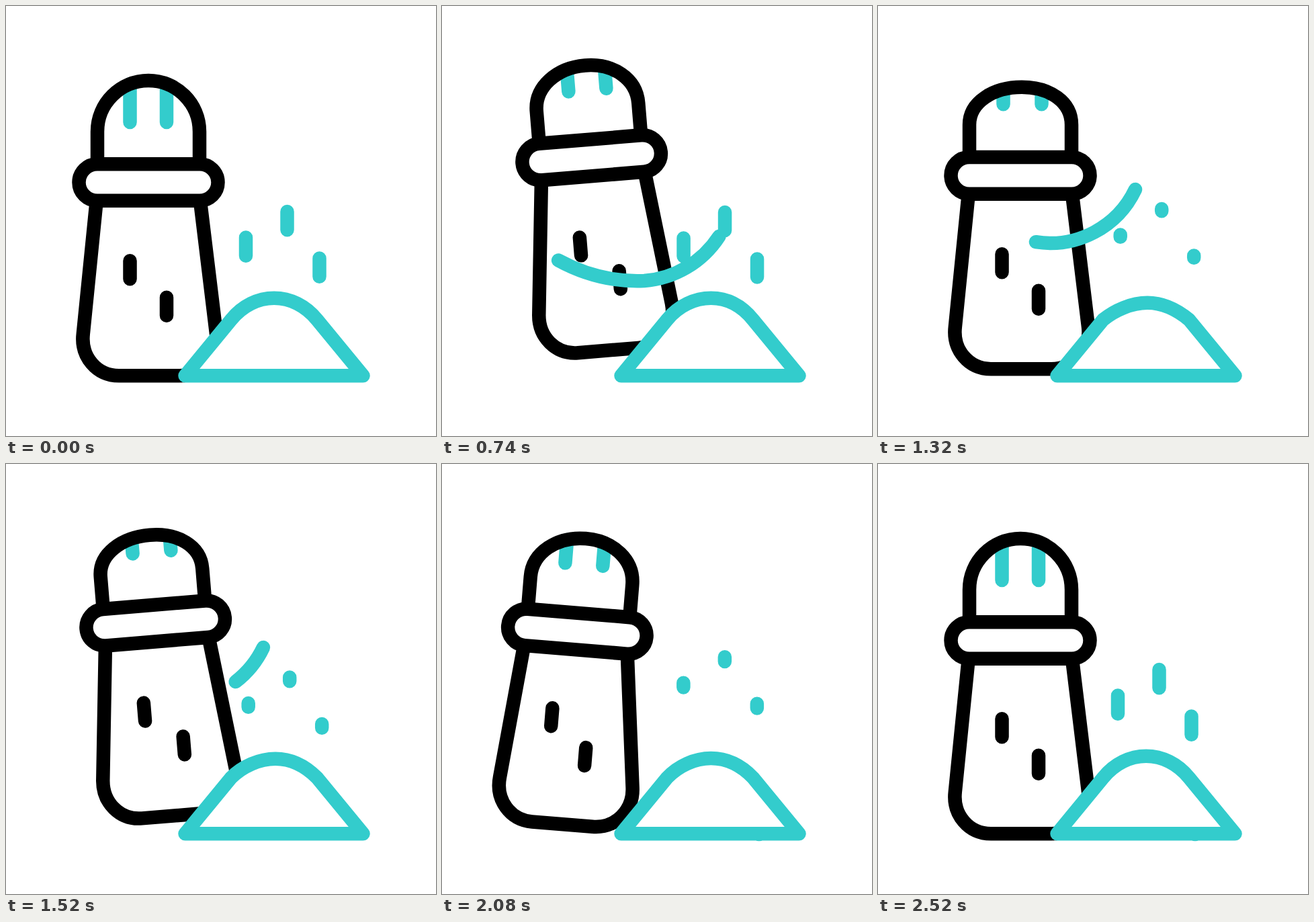
An HTML page that plays this animation: 640 px wide and 640 px high, repeating every 2800 ms.

```html
<!DOCTYPE html>
<html lang="en">
<head>
<meta charset="utf-8">
<title>Salt shaker</title>
<style>
  html, body { margin: 0; width: 100%; height: 100%; overflow: hidden; background: #fff; }
  svg { display: block; width: 100vw; height: 100vh; }
  svg * { stroke-width: 20.5; stroke-linecap: round; stroke-linejoin: round; }
  .ink { fill: none; stroke: #000; }
  .salt { fill: none; stroke: #3cc; }
  #pile { fill: #fff; }
  #dome, #body { stroke-linecap: butt; }
</style>
</head>
<body>
<svg viewBox="0 0 640 640">
  <g id="shaker">
    <path id="holes" class="salt"/>
    <path id="dome" class="ink"/>
    <path id="body" class="ink" d="M134.5 292 L114.8 488 C111 522 135 550.3 168 550.3 H258 C292 550.3 317 522 313 488 L289.2 292"/>
    <rect class="ink" x="108.5" y="235.2" width="207" height="54.6" rx="27.3"/>
    <path class="ink" d="M184.5 379.3 v27 M239 433.8 v27"/>
  </g>
  <path id="low" class="salt" pathLength="1" d="M172 378 C210 399 255 411 301 409 C352 405 398 375 422 326"/>
  <path id="high" class="salt" pathLength="1" d="M200 341 A140 140 0 0 0 383 273"/>
  <path id="grains" class="salt"/>
  <path id="pile" class="salt"/>
</svg>
<script>
const LOOP = 2800, START = 320, SHAKE = 960;
const GRAINS = [[357, 344.5], [418.5, 306], [466.5, 375.5]];
const GRAIN_LENGTH = 27.2, DROP = 148, FALL_TIME = 510;

const $ = id => document.getElementById(id);
const clamp = p => Math.min(1, Math.max(0, p));
const mix = (a, b, p) => a + (b - a) * p;

// Smooth step from 0 to 1.
function ramp(t, start, duration) {
  const p = clamp((t - start) / duration);
  return p * p * (3 - 2 * p);
}

// Two equal shakes: lean left, swing right, settle, with one hop each.
function shake(t) {
  const u = t < START + SHAKE ? t - START : t - START - SHAKE;
  return {
    lift: -31 * (ramp(u, 0, 480) - ramp(u, 505, 425)),
    tilt: 4.7 * (2 * ramp(u, 450, 360) - ramp(u, 40, 140) - ramp(u, 810, 150))
  };
}

function drawShaker(t, s) {
  const { lift, tilt } = shake(t);
  $('shaker').setAttribute('transform', `translate(0 ${lift - 9.5 * s}) rotate(${tilt} 212 132)`);
  const ry = 76 - 20 * s, top = 187 - ry, mid = 212 + 2 * s, side = 145 + 8 * s;
  $('dome').setAttribute('d',
    `M136 236 V187 C136 ${side} ${mid - 42} ${top} ${mid} ${top}` +
    ` C${mid + 42} ${top} 288 ${side} 288 187 V236`);
  const hole = x => {
    const y = 187 - ry * Math.sqrt(1 - ((x - mid) / 76) ** 2);
    return `M${x} ${y} V${173 - 16.5 * s}`;
  };
  $('holes').setAttribute('d', hole(184.5 + 2 * s) + hole(239 + 4.5 * s));
}

function drawSwoosh(id, t) {
  const end = ramp(t, 0, 500), start = ramp(t, 400, 540);
  const { style } = $(id);
  style.display = end - start > 0.001 ? '' : 'none';
  style.strokeDasharray = `${end - start} 3`;
  style.strokeDashoffset = -start;
}

// Offsets of the upper and lower end of every grain.
function grainOffsets(t) {
  if (t < 1228) {
    const y = DROP * ramp(t, 718, FALL_TIME);
    return [y, y];
  }
  if (t < 1930) {
    const p = ramp(t, 1420, FALL_TIME);
    return [mix(-4, DROP, p), mix(-28, DROP, p)];
  }
  const p = clamp((t - 1960) / 560);
  return [mix(-24, 0, p), mix(-50, 0, p)];
}

function drawGrains(t, s) {
  const [top, end] = grainOffsets(t);
  let d = t >= 1930 ? 'M472 530 V551' : '';
  if (t < 1930 || t > 1960)
    for (const [x, y] of GRAINS)
      d += `M${x + 3.7 * s} ${y + top} V${y + GRAIN_LENGTH + end}`;
  $('grains').setAttribute('d', d);
}

function drawPile(t, s) {
  const sink = ramp(t, 700, 600) - ramp(t, 2000, 520);
  const pulse = ramp(t, 1060, 260) - ramp(t, 1320, 260);
  const sag = 3.5 * (sink + pulse), x = 399 + 2 * s, y = 434.8 + sag;
  $('pile').setAttribute('d',
    `M266.5 550.3 L335 467 C352 ${446 + sag} ${x - 24} ${y} ${x} ${y}` +
    ` C${x + 24} ${y} 446 ${446 + sag} 463 467 L531.5 550.3 Z`);
}

function draw() {
  const t = performance.now() % LOOP;
  const s = ramp(t, 300, 700) - ramp(t, 1780, 740);
  drawShaker(t, s);
  drawSwoosh('low', t - START);
  drawSwoosh('high', t - START - 460);
  drawGrains(t, s);
  drawPile(t, s);
  requestAnimationFrame(draw);
}
draw();
</script>
</body>
</html>
```
